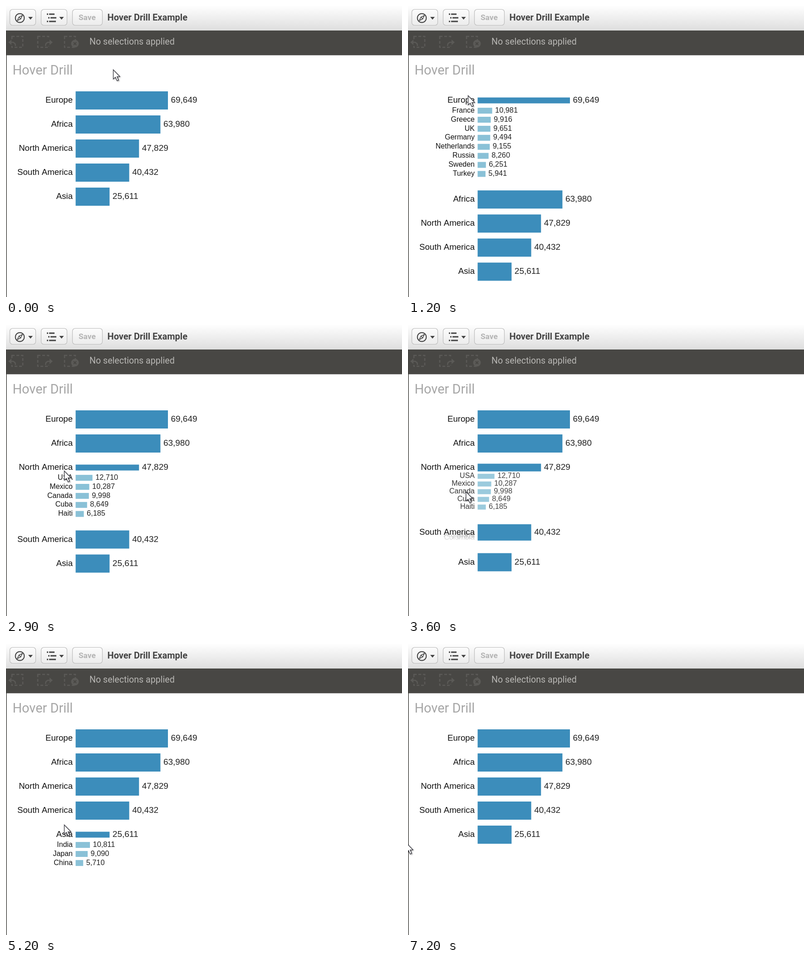
Recreate the animation shown at these times as an HTML page with a canvas. Size 873 px wide and 641 px high, loop 7.3 s.

```html
<!DOCTYPE html>
<html lang="en">
<head>
<meta charset="utf-8">
<title>Hover Drill Example</title>
<style>
  html, body { margin: 0; width: 100%; height: 100%; overflow: hidden; background: #fff; }
  canvas { display: block; }
</style>
</head>
<body>
<canvas id="stage" width="873" height="641"></canvas>
<script>
const ctx = document.getElementById('stage').getContext('2d');
const LOOP = 7300, STEP = 100, DRILL = 300;
const LEFT = 153.5, SCALE = 203.5 / 69649;
const UI = 'Roboto, sans-serif', CHART = '"Liberation Sans", Arial, sans-serif';

// Each region is drilled open from `open` to `close` (ms).
const regions = [
  { name: 'Europe', value: 69649, open: 800, close: 1700, items: {
    France: 10981, Greece: 9916, UK: 9651, Germany: 9494,
    Netherlands: 9155, Russia: 8260, Sweden: 6251, Turkey: 5941 } },
  { name: 'Africa', value: 63980, open: 1700, close: 2500, items: {
    Egypt: 14632, 'South Africa': 14501, Ethiopia: 12229,
    Tanzania: 9193, Nigeria: 8001, Kenya: 5424 } },
  { name: 'North America', value: 47829, open: 2500, close: 3500, items: {
    USA: 12710, Mexico: 10287, Canada: 9998, Cuba: 8649, Haiti: 6185 } },
  { name: 'South America', value: 40432, open: 3500, close: 4800, items: {
    Peru: 13037, Argentina: 12716, Brazil: 8446, Columbia: 6233 } },
  { name: 'Asia', value: 25611, open: 4800, close: 6400, items: {
    India: 10811, Japan: 9090, China: 5710 } }
];

// Pointer tip: time, x, y
const path = [
  [0, 236, 140], [100, 236, 140], [900, 132, 197], [1500, 132, 197],
  [2000, 125, 254], [2300, 125, 254], [2800, 128, 321], [3100, 128, 321],
  [3900, 127, 388], [4500, 127, 388], [4900, 128, 398], [6250, 128, 398],
  [6900, -4, 438], [7300, -4, 438]
];

const clamp = v => Math.max(0, Math.min(1, v));
const smooth = v => v * v * (3 - 2 * v);
const ease = v => (v = clamp(v), v < .5 ? 4 * v ** 3 : 1 - 4 * (1 - v) ** 3);

function text(str, x, y, font, color, align = 'left') {
  ctx.font = font;
  ctx.fillStyle = color;
  ctx.textAlign = align;
  ctx.fillText(str, x, y);
}

function poly(points, fill) {
  ctx.beginPath();
  points.forEach(([x, y]) => ctx.lineTo(x, y));
  ctx.closePath();
  if (fill) { ctx.fillStyle = fill; ctx.fill(); }
}

function line(color, width, ...points) {
  ctx.strokeStyle = color;
  ctx.lineWidth = width;
  ctx.beginPath();
  points.forEach(([x, y]) => ctx.lineTo(x, y));
  ctx.stroke();
}

function rect(x, y, w, h, fill) {
  ctx.fillStyle = fill;
  ctx.fillRect(x, y, w, h);
}

function shade(y0, y1, from, to) {
  const g = ctx.createLinearGradient(0, y0, 0, y1);
  g.addColorStop(0, from);
  g.addColorStop(1, to);
  return g;
}

function button(x, w) {
  ctx.beginPath();
  ctx.roundRect(x + .5, 7.5, w - 1, 35, 6);
  ctx.fillStyle = shade(7, 43, '#fcfcfc', '#ececec');
  ctx.fill();
  ctx.strokeStyle = '#bcbcbc';
  ctx.lineWidth = 1.2;
  ctx.stroke();
}

const caret = x => poly([[x - 5, 24], [x + 5, 24], [x, 30]], '#444');

function toolbar() {
  rect(0, 0, 873, 54, shade(0, 54, '#fefefe', '#dedede'));
  button(8, 58);
  button(77, 58);
  button(146, 67);

  ctx.strokeStyle = '#444';
  ctx.lineWidth = 2;
  ctx.beginPath();
  ctx.arc(30.5, 26.5, 9.8, 0, 7);
  ctx.stroke();
  ctx.lineWidth = 1.6;
  poly([[36, 21], [32.5, 28.5], [25, 32], [28.5, 24.5]]);
  ctx.stroke();
  line('#444', 1.4, [28.5, 24.5], [32.5, 28.5]);
  caret(54);

  [[90, 18, 12], [93, 26, 13], [90, 34, 15]].forEach(([x, y, w]) => {
    rect(x, y - 1.5, 3, 3, '#444');
    rect(x + 5, y - 1.5, w, 3, '#444');
  });
  caret(122.5);

  text('Save', 160, 31, 'bold 17.3px ' + UI, '#b4b4b4');
  text('Hover Drill Example', 223.5, 32, 'bold 20px ' + UI, '#444');
}

function selectionBar() {
  const back = '#484744', ink = '#5b5a57';
  rect(0, 54, 873, 54.5, back);

  ctx.strokeStyle = ink;
  ctx.lineWidth = 2.5;
  ctx.setLineDash([6, 4]);
  [13, 70, 129].forEach(x => ctx.strokeRect(x, 67, 24, 24));
  ctx.setLineDash([]);

  [[5, 1], [103, -1]].forEach(([x, d]) => {
    rect(Math.min(x, x + 17 * d), 73, 17, 15, back);
    line(ink, 2.5, [x + 2 * d, 80], [x + 11 * d, 80], [x + 15 * d, 83], [x + 16 * d, 88]);
    poly([[x, 80], [x + 7 * d, 74], [x + 7 * d, 86]], ink);
  });

  ctx.beginPath();
  ctx.arc(152, 83, 8.5, 0, 7);
  ctx.fillStyle = ink;
  ctx.fill();
  line(back, 2.2, [149, 80], [155, 86]);
  line(back, 2.2, [155, 80], [149, 86]);

  text('No selections applied', 184, 85, '19.6px ' + UI, '#b8b7b4');
}

function bar(name, value, y, height, size, fill) {
  const width = value * SCALE, base = Math.round(y - 1.5 + size * .35);
  rect(LEFT, y - height / 2, width, height, fill);
  text(name, 147, base, `${size}px ${CHART}`, '#111', 'right');
  text(value.toLocaleString('en-US'), LEFT + width + 6.5, base, `${size * 1.02}px ${CHART}`, '#222');
}

function chart(t) {
  let y = 208;
  for (const { name, value, open, close, items } of regions) {
    const drill = ease((t - open) / DRILL) - ease((t - close) / DRILL);
    const rows = Object.entries(items);
    if (drill > 0) {
      ctx.globalAlpha = drill;
      rows.forEach(([item, n], i) =>
        bar(item, n, y + drill * (22.6 + 19.9 * i), 13 * drill, 16, '#8ac1d7'));
      ctx.globalAlpha = 1;
    }
    bar(name, value, y, 40 - 27 * drill, 18.6, '#3c8dbb');
    y += 53 + drill * (19.9 * rows.length + 6);
  }
}

function pointer(t) {
  const i = path.findIndex(p => p[0] > t);
  const [t0, x0, y0] = path[i - 1], [t1, x1, y1] = path[i];
  const k = smooth((t - t0) / (t1 - t0));
  ctx.save();
  ctx.translate(x0 + (x1 - x0) * k, y0 + (y1 - y0) * k);
  ctx.shadowColor = 'rgba(0,0,0,.4)';
  ctx.shadowBlur = 3;
  ctx.shadowOffsetX = ctx.shadowOffsetY = 2;
  poly([[.5, .5], [.5, 21], [5.2, 16.8], [8.8, 24.8], [12.2, 23.2], [8.8, 15.6], [15, 15.4]], '#fff');
  ctx.shadowColor = 'transparent';
  ctx.strokeStyle = '#3c3c44';
  ctx.lineWidth = 1.4;
  ctx.stroke();
  ctx.restore();
}

function draw(now) {
  const t = Math.floor(now % LOOP / STEP) * STEP;
  rect(0, 0, 873, 641, '#fff');
  toolbar();
  selectionBar();
  rect(0, 108, 1.5, 533, '#484744');
  text('Hover Drill', 14.5, 151, '28.9px ' + UI, '#a6a6a6');
  chart(t);
  pointer(t);
}

const start = performance.now();
function frame() {
  draw(performance.now() - start);
  requestAnimationFrame(frame);
}
frame();
</script>
</body>
</html>
```
